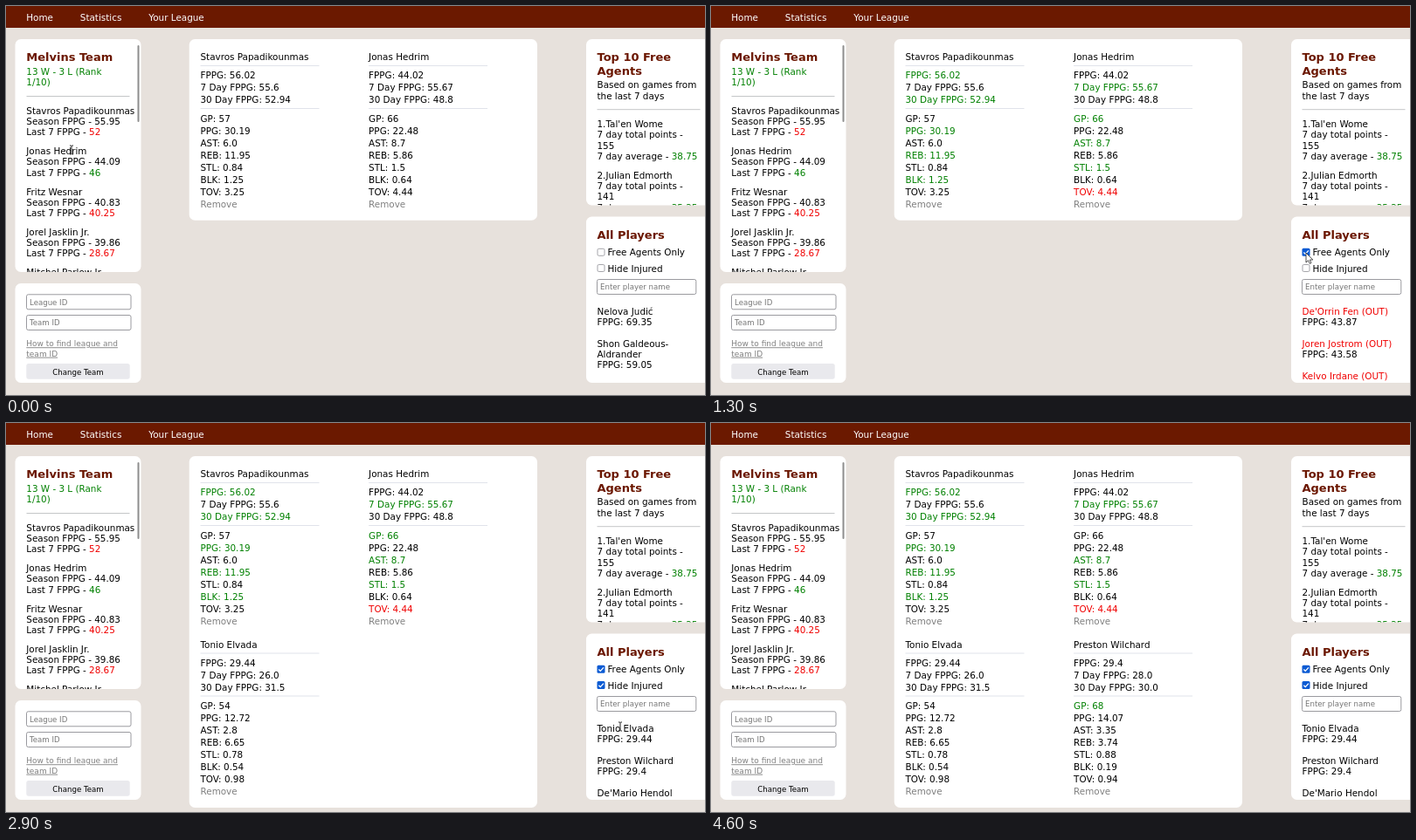
These frames come from a looping animation (800x446 px, 4700 ms). An HTML page:

```html
<!DOCTYPE html>
<html lang="en">
<head>
<meta charset="utf-8">
<title>Fantasy league dashboard</title>
<style>
  html, body { margin: 0; width: 100%; height: 100%; overflow: hidden; background: #e7e1dc; }
  svg { display: block; width: 100%; height: 100%; }
  text { font-family: "DejaVu Sans", Verdana, sans-serif; font-size: 10.4px; white-space: pre; }
  .title { font-size: 13px; font-weight: bold; fill: #6b1700; }
  .small { font-size: 8.6px; }
  .link { font-size: 9px; fill: #808080; text-decoration: underline; }
  .hint { fill: #757575; }
  .nav { fill: #fff; }
  .good { fill: #008000; }
  .bad { fill: #f00000; }
  .muted { fill: #808080; }
</style>
</head>
<body>
<svg viewBox="0 0 800 446" xmlns="http://www.w3.org/2000/svg">
  <defs>
    <clipPath id="teamClip"><rect x="10.5" y="38" width="144" height="267"/></clipPath>
    <clipPath id="topClip"><rect x="664" y="38" width="136" height="190.5"/></clipPath>
    <clipPath id="allClip"><rect x="664" y="241.5" width="136" height="190.5"/></clipPath>
  </defs>
  <g id="fixed"></g>
  <g id="compare"></g>
  <g id="players" clip-path="url(#allClip)"></g>
  <g id="cursor">
    <path id="arrow" d="M0 0V11L2.6 8.7L4.3 12.4L6 11.6L4.4 8H7.8Z" fill="#fff" stroke="#222" stroke-width=".8" stroke-linejoin="round"/>
    <path id="beam" d="M-2 -5H-.5L0 -4.5L.5 -5H2M0 -4.5V4.5M-2 5H-.5L0 4.5L.5 5H2" fill="none" stroke="#222" stroke-width="1"/>
  </g>
</svg>
<script>
const LOOP = 4700, STEP = 100;
const COMPARED = 100, FREE_ONLY = 1300, NO_INJURED = 2200, ADD_THIRD = 2900, ADD_FOURTH = 3600;
const $ = id => document.getElementById(id);

const text = (x, y, body, cls = "") => `<text x="${x}" y="${y}" class="${cls}">${body}</text>`;
const tint = (body, cls) => `<tspan class="${cls}">${body}</tspan>`;
const panel = (x, y, w, h) => `<rect x="${x}" y="${y}" width="${w}" height="${h}" rx="6.5" fill="#fff"/>`;
const rule = (x, y, w, color) => `<path d="M${x} ${y}h${w}" stroke="${color}"/>`;
const field = (x, y, w, hint) =>
  `<rect x="${x}" y="${y}" width="${w}" height="17" rx="2" fill="#fff" stroke="#8f8f95" stroke-width=".9"/>` +
  text(x + 3.5, y + 11.7, hint, "small hint");

const checkbox = (y, on) => on
  ? `<rect x="676.5" y="${y}" width="9" height="9" rx="1.5" fill="#0c5bd3"/>
     <path d="M678.4 ${y + 4.7}l1.9 1.9l3.6 -4" fill="none" stroke="#fff" stroke-width="1.3"/>`
  : `<rect x="677" y="${y + .5}" width="8" height="8" rx="1.5" fill="#fff" stroke="#8f8f95" stroke-width=".8"/>`;

const roster = [
  ["Stavros Papadikounmas", "55.95", "52"],
  ["Jonas Hedrim", "44.09", "46"],
  ["Fritz Wesnar", "40.83", "40.25"],
  ["Jorel Jasklin Jr.", "39.86", "28.67"],
  ["Mitchel Parlow Jr.", "", ""]
];
const topAgents = [["Tal'en Wome", 155, "38.75"], ["Julian Edmorth", 141, "35.25"]];

const labels = ["FPPG", "7 Day FPPG", "30 Day FPPG", "GP", "PPG", "AST", "REB", "STL", "BLK", "TOV"];
const cards = [
  ["Stavros Papadikounmas", "56.02 55.6 52.94 57 30.19 6.0 11.95 0.84 1.25 3.25"],
  ["Jonas Hedrim", "44.02 55.67 48.8 66 22.48 8.7 5.86 1.5 0.64 4.44"],
  ["Tonio Elvada", "29.44 26.0 31.5 54 12.72 2.8 6.65 0.78 0.54 0.98"],
  ["Preston Wilchard", "29.4 28.0 30.0 68 14.07 3.35 3.74 0.88 0.19 0.94"]
].map(([name, stats]) => ({ name, stats: stats.split(" ") }));

const everyone = [["Nelova Judić", "69.35"], ["Shon Galdeous-|Aldrander", "59.05"]];
const freeAgents = [["De'Orrin Fen (OUT)", "43.87"], ["Joren Jostrom (OUT)", "43.58"], ["Kelvo Irdane (OUT)", ""]];
const healthy = [["Tonio Elvada", "29.44"], ["Preston Wilchard", "29.4"], ["De'Mario Hendol", ""]];

function drawFixed() {
  const team = roster.map(([name, season, last], i) => {
    const y = 124 + i * 46.25;
    return text(23.3, y, name) + text(23.3, y + 12.2, "Season FPPG - " + season) +
      text(23.3, y + 24.4, "Last 7 FPPG - " + tint(last, +last > +season ? "good" : "bad"));
  }).join("");
  const top = topAgents.map(([name, total, average], i) => {
    const y = 139 + i * 58.8;
    return text(676.5, y, `${i + 1}.${name}`) + text(676.5, y + 12.3, "7 day total points -") +
      text(676.5, y + 24.5, total) + text(676.5, y + 36.8, "7 day average - " + tint(average, "good"));
  }).join("");

  $("fixed").innerHTML = `
    <rect width="800" height="446" fill="#e7e1dc"/>
    <rect width="800" height="25" fill="#6b1900"/>
    ${text(23.3, 17, "Home", "nav")}${text(84.8, 17, "Statistics", "nav")}${text(163.3, 17, "Your League", "nav")}
    ${panel(10.5, 38, 144, 267)}
    <g clip-path="url(#teamClip)">
      ${text(23.3, 63, "Melvins Team", "title")}
      ${text(23.3, 79, "13 W - 3 L (Rank", "good")}${text(23.3, 91, "1/10)", "good")}
      ${rule(23.5, 103.5, 118, "#c4c6c8")}${team}
      <rect x="150.5" y="45" width="2" height="88" rx="1" fill="#8e8e8e"/>
    </g>
    ${panel(10.5, 318, 144, 114)}
    ${field(23.5, 330.8, 119.5, "League ID")}${field(23.5, 354.5, 119.5, "Team ID")}
    ${text(23.3, 390.3, "How to find league and", "link")}${text(23.3, 401.7, "team ID", "link")}
    <rect x="23.3" y="410" width="118.4" height="17.7" rx="2.6" fill="#e9e9ed"/>
    <text x="82.5" y="422.7" class="small" text-anchor="middle">Change Team</text>
    ${panel(664, 38, 150, 190.5)}
    <g clip-path="url(#topClip)">
      ${text(676.5, 63, "Top 10 Free", "title")}${text(676.5, 78.5, "Agents", "title")}
      ${text(676.5, 94.3, "Based on games from")}${text(676.5, 106.5, "the last 7 days")}
      ${rule(676.5, 118.7, 118, "#c4c6c8")}${top}
    </g>
    ${panel(664, 241.5, 150, 190.5)}
    ${text(676.5, 267, "All Players", "title")}
    ${text(688.4, 286.4, "Free Agents Only")}${text(688.4, 304.7, "Hide Injured")}
    ${field(676.5, 313.5, 113.3, "Enter player name")}`;
}

function drawCompare(count, highlight) {
  const shown = cards.slice(0, count);
  const best = labels.map((_, s) => Math.max(...shown.map(card => +card.stats[s])));
  const body = shown.map(({ name, stats }, i) => {
    const x = 222.5 + (i % 2) * 192.6, y = 62 + (i >> 1) * 195.5;
    const rows = stats.map((value, s) => {
      const top = +value === best[s];
      const cls = highlight && top ? (labels[s] === "TOV" ? "bad" : "good") : "";
      return text(x, y + 21 + s * 14.05 + (s > 2 ? 7.4 : 0), `${labels[s]}: ${value}`, cls);
    }).join("");
    return text(x, y, name) + rule(x, y + 6.5, 136, "#e0e3ea") + rule(x, y + 55.5, 136, "#e0e3ea") +
      rows + text(x, y + 168.6, "Remove", "muted");
  }).join("");
  $("compare").innerHTML = panel(209.7, 38, 398.3, count > 2 ? 403 : 207.7) + body;
}

function drawPlayers(free, fit) {
  let y = 353.7, body = "";
  for (const [name, points] of fit ? healthy : free ? freeAgents : everyone) {
    for (const line of name.split("|")) {
      body += text(676.5, y, line, name.includes("OUT") ? "bad" : "");
      y += 12.25;
    }
    if (points) body += text(676.5, y, "FPPG: " + points);
    y += 24.9;
  }
  $("players").innerHTML = checkbox(277.8, free) + checkbox(296, fit) + body;
}

// time, x, y, pointer shape
const path = [
  [0, 75, 165, "beam"], [150, 75, 165, "arrow"], [800, 682.5, 290, "arrow"],
  [1000, 681, 283, "arrow"], [1500, 681, 283, "arrow"], [1900, 682, 302, "arrow"],
  [2300, 682, 302, "arrow"], [2700, 703, 348, "beam"], [3000, 703, 348, "beam"],
  [3300, 705, 387, "beam"], [3600, 705, 387, "arrow"], [3900, 171, 104, "beam"],
  [4100, 150, 36, "arrow"], [4300, 140, -20, "arrow"], [LOOP, 140, -20, "arrow"]
];

function moveCursor(t) {
  const i = path.findIndex((_, k) => t < path[k + 1][0]);
  const [t0, x0, y0, shape] = path[i], [t1, x1, y1] = path[i + 1];
  const u = (t - t0) / (t1 - t0), k = u * u * (3 - 2 * u);
  $("cursor").setAttribute("transform", `translate(${x0 + (x1 - x0) * k} ${y0 + (y1 - y0) * k})`);
  for (const id of ["arrow", "beam"]) $(id).style.display = id === shape ? "" : "none";
}

let drawn = "";
function render(t) {
  const count = 2 + (t >= ADD_THIRD) + (t >= ADD_FOURTH);
  const highlight = t >= COMPARED, free = t >= FREE_ONLY, fit = t >= NO_INJURED;
  const state = [count, highlight, free, fit].join();
  if (state !== drawn) {
    drawCompare(count, highlight);
    drawPlayers(free, fit);
    drawn = state;
  }
  moveCursor(t);
}

drawFixed();
render(0);
const start = performance.now();
function tick() {
  const t = (performance.now() - start) % LOOP;
  render(Math.floor(t / STEP) * STEP);
  requestAnimationFrame(tick);
}
requestAnimationFrame(tick);
</script>
</body>
</html>
```
